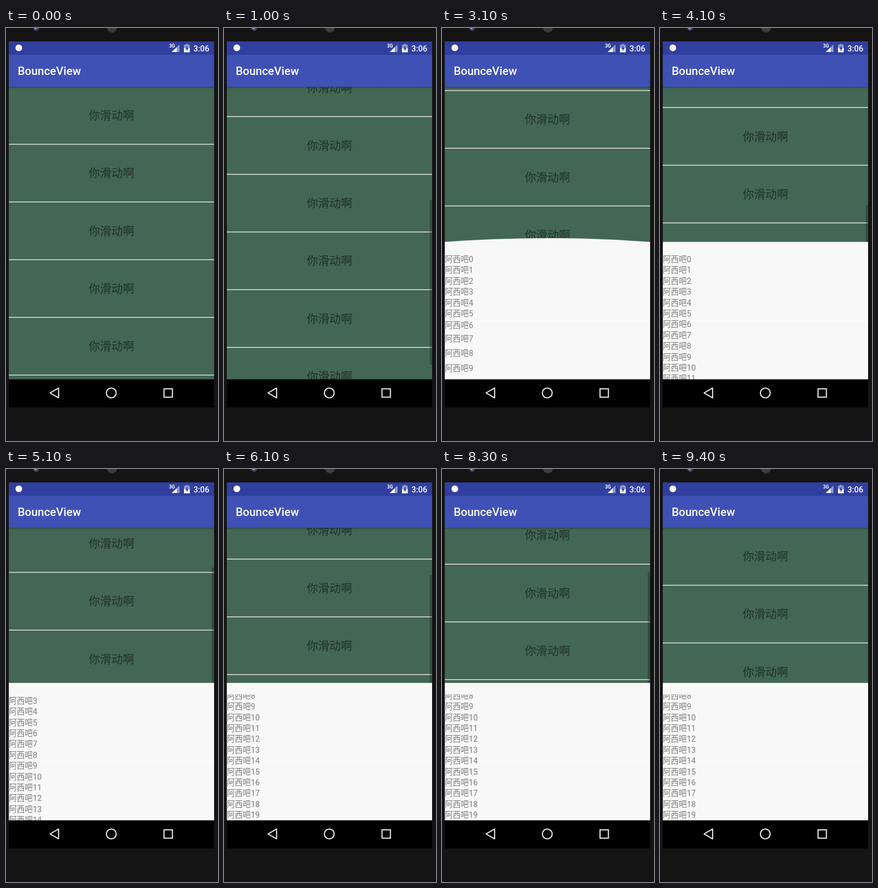
Recreate the animation shown at these times as an HTML page. Size 380 px wide and 739 px high, loop 9.6 s.

```html
<!DOCTYPE html>
<html lang="zh-CN">
<head>
<meta charset="utf-8">
<title>BounceView</title>
<style>
  html, body { margin: 0; width: 100%; height: 100%; overflow: hidden; background: #141414; }
  svg { display: block; width: 380px; height: 739px; font-family: Roboto, "Noto Sans CJK SC", "Noto Sans CJK", sans-serif; }
  .row { font-size: 20.4px; fill: #1f3229; text-anchor: middle; }
  .item { font-size: 14.3px; fill: #7c7c7c; }
  .nav { fill: none; stroke: #eee; stroke-width: 2; }
</style>
</head>
<body>
<svg viewBox="0 0 380 739">
  <defs>
    <clipPath id="view"><rect x="5" y="105" width="368" height="524"/></clipPath>
    <clipPath id="listBox"><rect x="5" y="403.5" width="368" height="225.5"/></clipPath>
    <linearGradient id="shade" x2="0" y2="1">
      <stop stop-color="#000" stop-opacity=".3"/>
      <stop offset="1" stop-color="#000" stop-opacity="0"/>
    </linearGradient>
    <pattern id="mesh" width="3" height="3" patternUnits="userSpaceOnUse">
      <rect width="3" height="3" fill="#222"/><circle cx="1.5" cy="1.5" r=".9" fill="#777"/>
    </pattern>
  </defs>

  <rect width="380" height="739" fill="#141414"/>
  <circle cx="54" cy="0" r="5" fill="#4a4870"/>
  <circle cx="53" cy="0" r="2" fill="#a9a8c8"/>
  <circle cx="190" cy="-1" r="9" fill="url(#mesh)"/>

  <g clip-path="url(#view)">
    <rect x="5" y="105" width="368" height="524" fill="#446655"/>
    <g id="rows"></g>
    <rect id="bar" x="368.7" width="4.3" height="295" fill="#000"/>
    <g id="sheet">
      <path id="panel" fill="#f8f8f8"/>
      <rect id="seam" x="5" y="523.5" width="368" height="1.3" fill="#fff"/>
    </g>
    <g clip-path="url(#listBox)"><g id="items"></g></g>
    <rect x="5" y="105" width="368" height="4" fill="url(#shade)"/>
  </g>

  <rect x="5" y="24" width="368" height="24" fill="#303f9f"/>
  <rect x="5" y="48" width="368" height="57.3" fill="#3f51b5"/>
  <text x="21" y="84.2" font-size="20.4" font-weight="500" fill="#fff">BounceView</text>
  <circle cx="23" cy="35.5" r="6" fill="#fff"/>
  <text x="292.3" y="35" font-size="8.4" font-weight="700" fill="#fff">3G</text>
  <path d="M311 29.5V43H297Z" fill="#8f98cc"/>
  <path d="M306 34.4V43H297Z" fill="#fff"/>
  <path d="M319 30h3v-1.6h4.4V30h3v5.5H319Z" fill="#8f98cc"/>
  <path d="M319 35.5h10.4V43.5H319Z" fill="#fff"/>
  <path d="M325.2 31.5L321.3 37.5H323.7V41.7L327.4 35.7H325.2Z" fill="#303f9f"/>
  <text x="336" y="41.6" font-size="14.4" font-weight="500" fill="#fff">3:06</text>

  <rect x="5" y="628.6" width="368" height="50.4" fill="#000"/>
  <path class="nav" d="M79 653L94.3 644.2V661.8Z" stroke-linejoin="round"/>
  <circle class="nav" cx="188.7" cy="653" r="8.8"/>
  <rect class="nav" x="283.3" y="645.6" width="15" height="15"/>
</svg>
<script>
const LOOP = 9600, TICK = 100;
const TOP = 105, BOTTOM = 629, REST = 382.7;
const PITCH = 103.25, LINE = 19.4, ROWS = 9, ITEMS = 20;
const RISE = 230, SETTLE = 338, BULGE = 25;
const SLIDE = 60, ENTER = 300, STAGGER = 30;
const BAR_HOLD = 430, BAR_FADE = 150;
const LIST_END = 163.4;

// Swipes on the page behind the sheet
const swipes = [
  { at: 570, ms: 670, to: 405.85 },
  { at: 4000, ms: 330, to: 334 },
  { at: 4430, ms: 520, to: 126.3 },
  { at: 5950, ms: 280, to: 156.9 },
  { at: 8240, ms: 560, to: 0 },
];
// Each opening of the sheet, with the swipe on its list
const openings = [
  { at: 2650, swipe: { at: 4940, ms: 610 } },
  { at: 7050, swipe: { at: 7540, ms: 600 } },
];

const $ = id => document.getElementById(id);
const clamp = x => Math.min(1, Math.max(0, x));
const ease = x => (1 - Math.cos(Math.PI * clamp(x))) / 2;
const fling = x => 1 - (1 - clamp(x) ** 1.5) ** 3;
const progress = (swipe, t) => fling((t - swipe.at) / swipe.ms);

function add(parent, tag, attrs, text = '') {
  const el = document.createElementNS('http://www.w3.org/2000/svg', tag);
  for (const key in attrs) el.setAttribute(key, attrs[key]);
  el.textContent = text;
  parent.appendChild(el);
  return el;
}

for (let i = 0; i < ROWS; i++) {
  add($('rows'), 'text', { class: 'row', x: 189, y: 164.2 + i * PITCH }, '你滑动啊');
  add($('rows'), 'rect', { x: 5, y: 207.4 + i * PITCH, width: 368, height: 1.3, fill: '#f4f6f5' });
}
const items = Array.from({ length: ITEMS }, (_, i) =>
  add($('items'), 'text', { class: 'item', x: 5 }, '阿西吧' + i));

function drawPage(t) {
  const y = swipes.reduce((from, s) => from + (s.to - from) * progress(s, t), 0);
  const last = swipes.findLast(s => s.at <= t);
  const idle = last ? t - last.at - last.ms - BAR_HOLD : Infinity;
  $('rows').setAttribute('transform', `translate(0 ${-y})`);
  $('bar').setAttribute('y', TOP + y * (BOTTOM - TOP) / (ROWS * PITCH));
  $('bar').setAttribute('opacity', .25 * (1 - clamp(idle / BAR_FADE)));
}

function drawSheet(t) {
  const opening = openings.findLast(o => o.at <= t);
  $('sheet').style.display = $('items').style.display = opening ? '' : 'none';
  if (!opening) return;

  const age = t - opening.at;
  const edge = BOTTOM - (BOTTOM - REST) * ease(age / RISE);
  const arc = 2 * BULGE * (1 - ease((age - RISE) / SETTLE));
  $('panel').setAttribute('d', `M5 ${edge}Q189 ${edge - arc} 373 ${edge}V${BOTTOM}H5Z`);
  $('sheet').setAttribute('opacity', age < TICK ? .04 : 1);
  $('seam').style.display = edge < 500 ? '' : 'none';

  const scroll = LIST_END * progress(opening.swipe, t);
  items.forEach((el, i) => {
    const p = ease((age - i * STAGGER) / ENTER);
    el.setAttribute('y', 419 + i * LINE - scroll + SLIDE * (1 - p));
    el.setAttribute('opacity', Math.min(1, p * 3.5));
  });
}

const start = performance.now();
function loop() {
  const elapsed = (performance.now() - start) % LOOP;
  const t = Math.floor(elapsed / TICK) * TICK;
  drawPage(t);
  drawSheet(t);
  requestAnimationFrame(loop);
}
loop();
</script>
</body>
</html>
```
